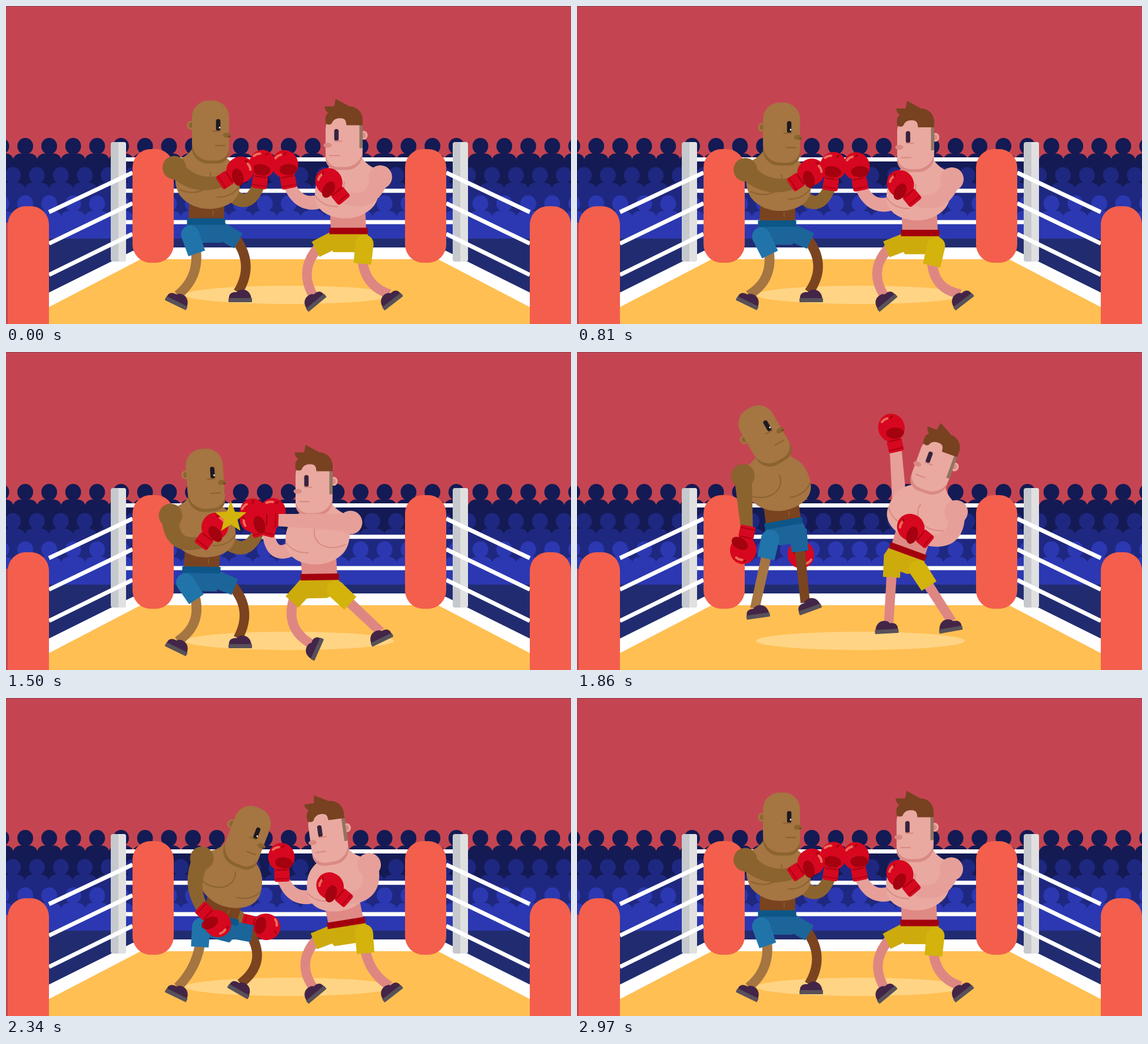
Write an HTML page with a canvas that moves like this. It is 960x540 px and loops after 3000 ms.

```html
<!DOCTYPE html>
<html lang="en">
<head>
<meta charset="utf-8">
<title>Boxing match</title>
<style>
html, body { margin: 0; width: 100%; height: 100%; overflow: hidden; background: #c44551; }
canvas { display: block; }
</style>
</head>
<body>
<canvas id="stage" width="960" height="540"></canvas>
<script>
const ctx = document.getElementById('stage').getContext('2d');
const LOOP = 3000, STEP = 30, RAD = Math.PI / 180;

// ---------- drawing helpers ----------
function shape(color, build) {
  ctx.fillStyle = color;
  ctx.beginPath();
  build(ctx);
  ctx.fill();
}
const poly = (color, pts) => shape(color, c => {
  pts.forEach(p => c.lineTo(p[0], p[1]));
  c.closePath();
});
const rect = (color, x, y, w, h, r = 0) => shape(color, c => c.roundRect(x, y, w, h, r));
const oval = (color, x, y, rx, ry = rx, a = 0) =>
  shape(color, c => c.ellipse(x, y, rx, ry, a, 0, Math.PI * 2));

function stroke(color, width, build) {
  ctx.strokeStyle = color;
  ctx.lineWidth = width;
  ctx.beginPath();
  build(ctx);
  ctx.stroke();
}
const line = (color, width, x0, y0, x1, y1) => stroke(color, width, c => {
  c.moveTo(x0, y0);
  c.lineTo(x1, y1);
});
function local(x, y, angle, side, draw) {
  ctx.save();
  ctx.translate(x, y);
  ctx.rotate(angle);
  ctx.scale(side, 1);
  draw();
  ctx.restore();
}
function place([x, y], angle, px, py) {
  const c = Math.cos(angle), s = Math.sin(angle);
  return [x + px * c - py * s, y + px * s + py * c];
}

// Tapered curved limb; bend pushes the middle sideways. Returns the end direction.
function limb(color, a, b, bend, w0, w1) {
  const dx = b[0] - a[0], dy = b[1] - a[1], len = Math.hypot(dx, dy) || 1;
  const cx = (a[0] + b[0]) / 2 + dy / len * bend;
  const cy = (a[1] + b[1]) / 2 - dx / len * bend;
  const one = [], two = [];
  for (let i = 0; i <= 20; i++) {
    const u = i / 20, v = 1 - u;
    const x = v * v * a[0] + 2 * v * u * cx + u * u * b[0];
    const y = v * v * a[1] + 2 * v * u * cy + u * u * b[1];
    const tx = v * (cx - a[0]) + u * (b[0] - cx);
    const ty = v * (cy - a[1]) + u * (b[1] - cy);
    const k = (w0 + (w1 - w0) * u) / 2 / (Math.hypot(tx, ty) || 1);
    one.push([x + ty * k, y - tx * k]);
    two.unshift([x - ty * k, y + tx * k]);
  }
  poly(color, one.concat(two));
  return Math.atan2(b[1] - cy, b[0] - cx);
}

// ---------- arena ----------
function crowd(color, x0, headY, bottom) {
  for (let x = x0; x < 1000; x += 40.7) {
    oval(color, x, headY, 13.4, 14);
    rect(color, x - 21, headY + 12.5, 42, 40, 13);
  }
  rect(color, 0, headY + 27, 960, bottom - headY - 27);
}
function mirrored(draw) {
  draw();
  local(963, 0, 0, -1, draw);
}
function arena() {
  rect('#c44551', 0, 0, 960, 540);
  rect('#8f3a4c', 0, 0, 960, 1);
  crowd('#141a54', -8, 238, 310);
  crowd('#1f2880', -29, 287.5, 360);
  crowd('#2c38b1', -8, 335.5, 395);
  rect('#212c70', 0, 395, 960, 145);
  poly('#fff', [[60, 493], [215, 416], [240, 410], [723, 410], [748, 416], [903, 493], [903, 540], [60, 540]]);
  poly('#ffbf53', [[60, 518], [229, 430], [734, 430], [903, 518], [903, 540], [60, 540]]);
  oval('#ffd484', 481.5, 490.5, 177.5, 15.5);
  for (const x of [178, 759]) {
    rect('#c5c9ce', x, 231, 26, 203, 4);
    rect('#e0e0e1', x + 13, 231, 13, 203, [0, 4, 4, 0]);
  }
  for (let i = 0; i < 3; i++) line('#fff', 7, 204, 260.5 + i * 53.2, 759, 260.5 + i * 53.2);
  mirrored(() => {
    for (let i = 0; i < 3; i++) line('#fff', 7, 73, 350 + i * 53.3, 215, 283 + i * 52);
    rect('#f35f4c', 215, 243, 70, 193, 31);
    rect('#f35f4c', 3, 340, 70, 230, 31);
  });
  rect('#c44551', 0, 368, 3, 172);
}

// ---------- fighters ----------
// Each leg and arm has a length; turn is how far the glove twists from the forearm.
const left = {
  side: 1, faceY: 0, neck: 87, shins: [87, 78], arms: [88, 94], turns: [-12, -14],
  skin: '#a57542', shade: '#8b632f', arm: '#8b632f', belly: '#79431f',
  farLeg: '#7b4420', nearLeg: '#a57542', belt: '#0d5688', farCloth: '#1b659a', cloth: '#2174aa',
  eye: '#1d1a20', patch: [0, 8], shine: [-9, 3]
};
const right = {
  side: -1, faceY: 6, neck: 92, shins: [78, 69], arms: [88, 90], turns: [10, 28],
  skin: '#e9a9a0', shade: '#da8a84', arm: '#e6a099', belly: '#df8a85',
  farLeg: '#de8782', nearLeg: '#de8782', belt: '#a3000d', farCloth: '#cdab0d', cloth: '#d3b30c',
  eye: '#38233d', hair: '#784120', patch: [4, -9], shine: [-7, -5]
};

// A pose holds the belt, the lean of the body, the tilt of the head, both wrists and both feet.
const pose = (stand, { belt, lean = 0, tilt = 0, far, near, farFoot = stand[0], nearFoot = stand[1] }) => [
  ...belt, lean, tilt, far[0], far[1], far[2] || 0, near[0], near[1], near[2] || 0, ...farFoot, ...nearFoot
];
function shift(p, dx, dy, feet) {
  const moved = p.slice();
  for (const i of feet ? [0, 4, 7, 10, 13] : [0, 4, 7]) {
    moved[i] += dx;
    moved[i + 1] += dy;
  }
  return moved;
}
const mix = (a, b, k) => a.map((v, i) => v + (b[i] - v) * k);

const standL = [[398, 493, 0], [292, 499, 26]];
const guardL = pose(standL, { belt: [340, 366], far: [431, 300], near: [371, 296] });
const hitL = pose(standL, { belt: [332, 370], lean: 1, tilt: -4, far: [430, 303, -30], near: [336, 322, -24] });
const airL = pose(standL, {
  belt: [351, 291], lean: -10, tilt: -30, far: [375, 312, 35], near: [289, 305, 30],
  farFoot: [394, 431, -20], nearFoot: [307, 442, -8]
});
const landL = pose(standL, {
  belt: [363, 374], lean: 14, tilt: 21, far: [411, 381], near: [336, 361], farFoot: [398, 493, 30]
});
const dipL = shift(guardL, 0, 3.5);

const standR = [[523, 499, -40], [653, 497, -38]];
const guardR = pose(standR, { belt: [582, 382], far: [480, 300], near: [569, 323] });
const jabR = pose(standR, {
  belt: [533, 382], lean: -1, far: [445, 303, 10], near: [453, 285, -28],
  farFoot: [523, 502, -66], nearFoot: [636, 483, -26]
});
const upperR = pose(standR, {
  belt: [562, 339], lean: 20, tilt: 20, far: [541, 160, -18], near: [592, 318],
  farFoot: [526, 468, -3], nearFoot: [634, 465, -10]
});
const landR = pose(standR, { belt: [578, 382], lean: -9, tilt: -8, far: [469, 302, 6], near: [575, 340, 14] });
const dipR = shift(guardR, 1, 3.5);

const leftKeys = [
  [0, guardL], [240, mix(guardL, dipL, 0.7)], [480, guardL], [810, dipL],
  [1080, shift(hitL, -3, 0)], [1290, shift(hitL, 3, 1)], [1500, hitL], [1620, shift(hitL, -18, 1)],
  [1860, airL], [2010, shift(airL, -7, -7, true)], [2160, shift(airL, 2, 3, true)],
  [2340, landL], [2660, dipL], [2970, guardL]
];
const rightKeys = [
  [0, guardR], [240, mix(guardR, dipR, 0.7)], [480, guardR], [810, dipR],
  [1290, mix(guardR, jabR, 0.4)], [1440, shift(jabR, -10, 0)], [1500, jabR],
  [1680, shift(mix(jabR, guardR, 0.4), 0, 6)], [1860, upperR], [2000, shift(upperR, 1, -4, true)],
  [2340, landR], [2660, dipR], [2970, guardR]
];

// Smooth curve through the keys without overshoot.
function poseAt(keys, t) {
  let n = 0;
  while (n < keys.length - 2 && t >= keys[n + 1][0]) n++;
  const [t0, a] = keys[n], [t1, b] = keys[n + 1];
  const before = keys[n - 1], after = keys[n + 2];
  const h = t1 - t0, u = Math.min(1, (t - t0) / h), v = 1 - u;
  const slope = (p, q) => p * q > 0 ? 2 * p * q / (p + q) : 0;
  return a.map((y0, i) => {
    const y1 = b[i], d = (y1 - y0) / h;
    const m0 = before ? slope((y0 - before[1][i]) / (t0 - before[0]), d) : 0;
    const m1 = after ? slope(d, (after[1][i] - y1) / (after[0] - t1)) : 0;
    return v * v * (1 + 2 * u) * y0 + u * u * (3 - 2 * u) * y1 + h * u * v * (v * m0 - u * m1);
  });
}

function glove([x, y], angle, patch, shine) {
  local(x, y, angle, 1, () => {
    rect('#d50820', -10, -13, 22, 26, 4);
    line('#a3020e', 1.5, -5, -12, -5, 12);
    oval('#d7071f', 32, 0, 24, 22.5);
    oval('#a3020e', 22, patch, 9.5, 15, patch * 0.04);
    line('#a3020e', 2, 10, -10, 10, 10);
    ctx.lineCap = 'round';
    stroke('#ee6c5c', 4, c => c.ellipse(32, shine * 0.5, 17, 16, 0, -0.35 + shine * 0.05, 0.35 + shine * 0.05));
    line('#a3020e', 2.5, 48, -shine - 5, 51, -shine - 2);
    ctx.lineCap = 'butt';
  });
}

// The elbow takes up whatever length the reach leaves over.
function arm(f, which, shoulder, [x, y, turn], w0) {
  const full = f.arms[which], d = Math.hypot(x - shoulder[0], y - shoulder[1]);
  const bend = Math.sqrt(Math.max(0, 1.5 * d * (full - d)));
  const angle = limb(f.arm, shoulder, [x, y], -f.side * bend, w0, 20);
  glove([x, y], angle + (f.turns[which] + turn) * RAD, f.patch[which], f.shine[which]);
}

function shoe(x, y, angle, side) {
  local(x, y, angle, side, () => {
    shape('#432547', c => {
      c.moveTo(-19, 4);
      c.bezierCurveTo(-20, -5, -13, -8, -6, -7);
      c.bezierCurveTo(-2, -14, 17, -15, 19, 4);
    });
    rect('#585159', -20, 3, 40, 7, 1);
  });
}

// Two-bone leg: draws shin and shoe, returns the hem of the shorts.
function leg(f, color, hip, [x, y, deg], thigh, shin, bulge) {
  const ankle = place([x, y], deg * RAD, -4 * f.side, -7);
  const dx = ankle[0] - hip[0], dy = ankle[1] - hip[1], d = Math.hypot(dx, dy);
  const cos = (thigh * thigh + d * d - shin * shin) / (2 * thigh * d);
  const open = Math.acos(Math.max(-1, Math.min(1, cos))) * bulge;
  const angle = Math.atan2(dy, dx) - open;
  limb(color, place(hip, angle, thigh - 4, 0), ankle, 43 * Math.sin(open), 17, 16);
  shoe(x, y, deg * RAD, f.side);
  return place(hip, angle, thigh, 0);
}

function headPath(c, top) {
  c.roundRect(-31.5, top, 63, 52 - top, [28, 28, 22, 30]);
}
function hair(color) {
  rect('#8f7462', -31.5, -20, 5.5, 40);
  shape(color, c => {
    c.moveTo(-31.5, -19);
    c.lineTo(-31.5, -29);
    c.bezierCurveTo(-31, -43, -20, -51, -9, -51);
    c.lineTo(14.5, -64);
    c.lineTo(17, -51);
    c.lineTo(33.5, -51);
    c.quadraticCurveTo(32, -43, 27, -40);
    c.bezierCurveTo(33, -36, 32, -28, 31.5, -22);
    c.quadraticCurveTo(25, -18, 21, -22);
    c.quadraticCurveTo(18, -31, 7, -31);
    c.bezierCurveTo(-3, -31, -3, -26, -4, -19);
  });
}
function head(f, [x, y], angle) {
  local(x, y, angle, f.side, () => {
    const oy = f.faceY;
    local(0, 5, 0, 1, () => shape(f.shade, c => headPath(c, 0)));
    oval(f.skin, -33.5, -8 + oy, 6.5, 7.5);
    oval(f.shade, -33, -8 + oy, 3.5, 4.5);
    shape(f.skin, c => headPath(c, f.hair ? -40 : -50));
    rect(f.eye, 9.3, -18.5 + oy, 7.5, 20, 3.5);
    line(f.shade, 2.2, 3, 2 + oy, 17, 2 + oy);
    line(f.shade, 2.2, 7.5, 26.5 + oy, 25, 26.5 + oy);
    oval(f.shade, 28, 9 + oy, 7, 4.2);
    if (f.hair) {
      hair(f.hair);
    } else {
      oval('#fff', 15.5, -4, 1.3, 1.5);
      oval('#6d4a22', 32, 11, 2.2, 1.6);
    }
  });
}

function torso(f, [x, y], angle) {
  local(x, y, angle, f.side, () => {
    shape(f.skin, c => {
      c.moveTo(-19, -64);
      c.bezierCurveTo(-25, -50, -32, -44, -44, -38);
      c.bezierCurveTo(-55, -25, -56, 10, -43, 26);
      c.bezierCurveTo(-30, 42, -8, 48, 8, 47);
      c.bezierCurveTo(35, 46, 58, 32, 57, 8);
      c.bezierCurveTo(57, -12, 50, -30, 33, -40);
      c.lineTo(25, -60);
    });
    stroke(f.shade, 2, c => {
      c.moveTo(-45, 14);
      c.bezierCurveTo(-18, 27, 14, 14, 7, -15);
      c.moveTo(18, 27);
      c.quadraticCurveTo(44, 28, 57, 8);
    });
  });
}

function fighter(f, p) {
  const s = f.side, belt = p.slice(0, 2);
  const lean = p[2] * RAD, tilt = p[3] * RAD;
  const chest = place(belt, lean, 0, -68.5);
  const neck = f.neck - 0.3 * Math.max(0, p[3] * s);
  const face = place(chest, (lean + tilt) / 2, 7.5 * s, -neck);
  const onChest = (x, y) => place(chest, lean, x * s, y);
  const onBelt = (x, y) => place(belt, lean, x * s, y);

  arm(f, 0, onChest(34, 12), p.slice(4, 7), 25);

  const farHip = onBelt(22, 14), nearHip = onBelt(-27, 22);
  const farHem = leg(f, f.farLeg, farHip, p.slice(10, 13), 38, f.shins[0], s);
  const nearHem = leg(f, f.nearLeg, nearHip, p.slice(13, 16), 34, f.shins[1], s);

  limb(f.belly, onChest(2, 22), belt, 0, 60, 60);
  local(...belt, lean, s, () => {
    line(f.shade, 1.5, 12, -19, 12, -11);
    poly(f.farCloth, [[-32.5, 4], [32.5, 4], [36, 18], [26, 36], [-12, 36], [-34, 24]]);
  });
  limb(f.farCloth, farHip, farHem, 0, 30, 29);
  limb(f.cloth, nearHip, nearHem, 0, 31, 30);
  oval(f.cloth, ...nearHip, 15.5);
  local(...belt, lean, s, () => rect(f.belt, -32.5, -5.5, 65, 11));

  torso(f, chest, lean);
  head(f, face, tilt);

  const shoulder = onChest(-54, -23);
  oval(f.arm, ...shoulder, 20);
  arm(f, 1, shoulder, p.slice(7, 10), 30);
}

function star(t) {
  if (t < 1440 || t > 1560) return;
  const size = t < 1470 ? 18 : 28, pts = [];
  for (let i = 0; i < 10; i++) {
    const r = i % 2 ? size * 0.43 : size;
    pts.push(place([382, 281], i * Math.PI / 5, 0, -r));
  }
  poly('#d4b30c', pts);
}

function frame() {
  const t = Math.floor(performance.now() % LOOP / STEP) * STEP;
  arena();
  fighter(left, poseAt(leftKeys, t));
  fighter(right, poseAt(rightKeys, t));
  star(t);
  requestAnimationFrame(frame);
}
frame();
</script>
</body>
</html>
```
